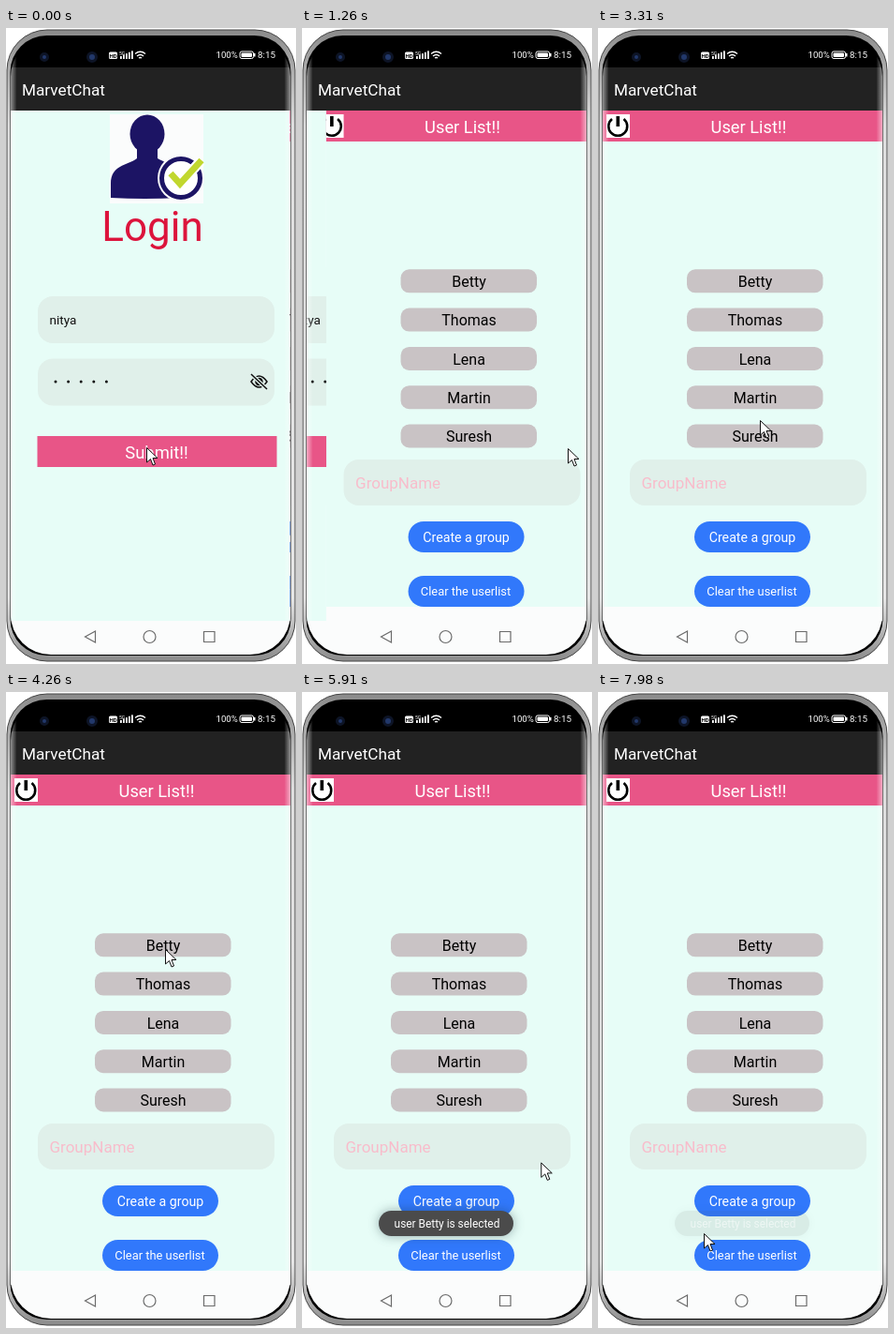
Write an HTML page that moves like this. It is 310 px wide and 678 px high and loops after 8000 ms.

```html
<!DOCTYPE html>
<html lang="en">
<head>
<meta charset="utf-8">
<title>Chat login</title>
<style>
  html, body { margin: 0; width: 100%; height: 100%; overflow: hidden; background: #fff; }
  svg { display: block; width: 310px; height: 678px; font-family: Roboto, "Noto Sans", sans-serif; }
  .mid { text-anchor: middle; }
  .bar { fill: #e85587; }
  .field { fill: #e0f0ea; }
  .pill { fill: #c9c3c5; }
  .btn { fill: #3178fb; }
  .light { fill: #fff; }
  .paper { fill: #fbfcfc; }
  .mint { fill: #e7fdf7; }
  .navy { fill: #1c1464; }
  .line { fill: none; stroke: #6b6b6b; stroke-width: 1.2; }
  #halo { filter: drop-shadow(0 0 6px rgba(20, 50, 60, .4)); }
</style>
</head>
<body>
<svg viewBox="0 0 310 678">
  <defs>
    <clipPath id="screen"><rect x="5" y="9" width="299" height="659" rx="43"/></clipPath>
    <clipPath id="reveal"><rect id="edge" x="5" y="88" width="299" height="544"/></clipPath>
    <linearGradient id="metal" x2="0" y2="1">
      <stop offset="0" stop-color="#8a8a8a"/>
      <stop offset=".15" stop-color="#dedede"/>
      <stop offset=".9" stop-color="#e6e6e6"/>
      <stop offset="1" stop-color="#8a8a8a"/>
    </linearGradient>
    <linearGradient id="shine">
      <stop offset="0" stop-color="#fff" stop-opacity=".5"/>
      <stop offset=".022" stop-color="#fff" stop-opacity="0"/>
      <stop offset=".978" stop-color="#fff" stop-opacity="0"/>
      <stop offset="1" stop-color="#fff" stop-opacity=".5"/>
    </linearGradient>
  </defs>

  <!-- phone body -->
  <rect x="1" y="2" width="308" height="673" rx="43" fill="url(#metal)" stroke="#444"/>
  <rect x="4.500" y="8" width="300" height="661" rx="39"/>

  <g clip-path="url(#screen)">
    <rect y="42" width="310" height="46" fill="#222"/>
    <rect class="paper" y="88" width="310" height="580"/>

    <g id="login">
      <rect class="mint" x="5" y="88" width="360" height="544"/>
      <rect class="paper" x="111" y="92" width="100" height="95"/>
      <g class="navy">
        <ellipse cx="151" cy="113" rx="18.500" ry="20.500"/>
        <path d="M140 125h22v14c12 7 23 5 23 20v22q-37 2-73 0v-15c0-20 17-19 28-27Z"/>
      </g>
      <circle class="paper" cx="187" cy="160" r="25"/>
      <circle class="light" cx="187" cy="160" r="20.500" stroke="#1c1464" stroke-width="5"/>
      <g fill="none">
        <path d="M176 156l10 10 22-24" stroke="#fff" stroke-width="11"/>
        <path d="M176 155l10 11 23-25" stroke="#c1d72e" stroke-width="7"/>
      </g>
      <text class="mid" x="156.500" y="227" font-size="44" fill="#dc143c">Login</text>
      <rect class="field" x="34" y="286" width="253" height="50" rx="16"/>
      <text x="46.500" y="316" font-size="13.500" fill="#111">nitya</text>
      <rect class="field" x="34" y="352.500" width="253" height="50" rx="16"/>
      <g id="dots" fill="#111"></g>
      <g fill="none" stroke="#111" stroke-width="1.500">
        <path d="M262 377q8.500-12 17 0q-8.500 12-17 0Z"/>
        <circle cx="270.500" cy="377" r="3.500" fill="#111"/>
        <path d="M263 370l16 15" stroke="#e0f0ea" stroke-width="4"/>
        <path d="M262 369l17 16"/>
      </g>
      <rect class="bar" x="33.500" y="435" width="256" height="33"/>
      <text class="mid light" x="161" y="458.500" font-size="18.400">Submit!!</text>
    </g>

    <g clip-path="url(#reveal)">
      <g id="users">
        <rect class="paper" x="5" y="88" width="299" height="544"/>
        <rect class="mint" x="5" y="88" width="299" height="529"/>
        <rect class="bar" x="5" y="88" width="299" height="33"/>
        <rect class="light" x="9" y="92" width="25" height="25"/>
        <g fill="none" stroke="#000">
          <path d="M15 97a10 10 0 1 0 12.500 0" stroke-width="2.600"/>
          <path d="M21.300 94v11" stroke-width="3.600"/>
        </g>
        <text class="mid light" x="161" y="111.500" font-size="18.300">User List!!</text>
        <g id="names"></g>
        <rect class="field" x="34" y="460" width="253" height="49" rx="16"/>
        <text x="46.500" y="491" font-size="17" fill="#f8bccb">GroupName</text>
        <rect class="btn" x="103" y="526" width="124" height="33" rx="16.500"/>
        <text class="mid light" x="165" y="547.500" font-size="14.200">Create a group</text>
        <rect class="btn" x="103" y="584" width="124" height="33" rx="16.500"/>
        <text class="mid light" x="164.500" y="605" font-size="12.900">Clear the userlist</text>
      </g>
    </g>

    <rect x="5" y="9" width="299" height="659" fill="url(#shine)"/>
    <path class="line" d="M95.500 643v12l-11-6ZM211.500 643.500h11.500v11h-11.500Z"/>
    <circle class="line" cx="153.500" cy="649" r="6.500"/>
  </g>

  <!-- status bar -->
  <g fill="#22386a" stroke="#0d1426" stroke-width="3">
    <circle cx="41" cy="31" r="3.500"/><circle cx="92" cy="31" r="4.500"/>
  </g>
  <g class="light">
    <rect x="110" y="25.500" width="9" height="7.500" rx="1.500"/>
    <text class="mid" x="114.500" y="31.500" font-size="6" font-weight="700" fill="#000">HD</text>
    <text x="121" y="28.500" font-size="5">5G</text>
    <g id="signal"></g>
    <path d="M138 27.500q5.500-4.500 11 0M140 30q3.500-3 7 0M142 32q1.500-1 3 0" fill="none" stroke="#fff" stroke-width="1.400"/>
    <text x="224.500" y="32" font-size="9.600">100%</text>
    <rect x="250" y="25" width="14.500" height="7.500" rx="2" fill="none" stroke="#fff"/>
    <rect x="251.500" y="26.500" width="11.500" height="4.500" rx="1"/>
    <rect x="265" y="27" width="1.500" height="3.500"/>
    <text x="269" y="32" font-size="9.800">8:15</text>
    <text x="17" y="72" font-size="17.200">MarvetChat</text>
  </g>

  <g id="toast">
    <rect id="halo" x="82" y="553" width="144" height="27" rx="13.500" fill="#4b4b4b"/>
    <text id="note" class="mid light" x="155" y="571" font-size="11.900">user Betty is selected</text>
  </g>
  <path id="cursor" class="light" d="M.5.5v15.500l4-3.500 2.500 6.500 2.500-1-2.500-6.500h5Z" stroke="#111"/>
</svg>
<script>
const LOOP = 8000, STEP = 150, WIDTH = 297, LEFT = 6;
const SLIDE_AT = 1260, TOAST_IN = 5450, TOAST_OUT = 7880;

// Rests and turning points of the pointer: time, x, y.
const path = [
  [300, 150, 447], [450, 240, 390], [600, 284, 448], [1350, 284, 448],
  [1950, 164, 187], [2400, 112, 118], [2850, 219, 250], [3300, 173, 418],
  [3600, 136, 584], [3900, 170, 274], [4500, 170, 274], [5100, 147, 571],
  [5400, 279, 590], [6600, 204, 310], [7350, 204, 310], [7500, 246, 360],
  [7800, 140, 592], [7950, 113, 577]
];

const $ = id => document.getElementById(id);
const clamp = v => Math.min(1, Math.max(0, v));
const ease = v => v * v * (3 - 2 * v);
const shift = (id, x, y = 0) => $(id).setAttribute('transform', `translate(${x} ${y})`);
const repeat = (id, items, make) => { $(id).innerHTML = items.map(make).join(''); };
const five = [0, 1, 2, 3, 4];

repeat('dots', five, i => `<circle cx="${53 + 13.6 * i}" cy="377" r="1.5"/>`);
repeat('signal', five, i =>
  `<rect x="${122 + 3 * i}" y="${30 - 1.4 * i}" width="1.8" height="${3 + 1.4 * i}"/>`);
repeat('names', ['Betty', 'Thomas', 'Lena', 'Martin', 'Suresh'], (name, i) => {
  const y = 257.3 + 41.3 * i;
  return `<rect class="pill" x="95" y="${y}" width="145.5" height="25" rx="9"/>
    <text class="mid" x="168" y="${y + 18.7}" font-size="16">${name}</text>`;
});

function pointerAt(t) {
  const next = path.findIndex(p => p[0] > t);
  if (next < 1) return path.at(next).slice(1);
  const [t0, x0, y0] = path[next - 1], [t1, x1, y1] = path[next];
  const k = ease((t - t0) / (t1 - t0));
  return [x0 + (x1 - x0) * k, y0 + (y1 - y0) * k];
}

function draw(t) {
  shift('cursor', ...pointerAt(Math.floor(t / STEP) * STEP));

  const steps = Math.max(0, Math.floor((t - SLIDE_AT) / STEP) + 1);
  const rest = .067 ** steps;
  const hidden = WIDTH * rest;
  $('edge').setAttribute('x', steps > 2 ? LEFT - 1 : LEFT + hidden);
  shift('users', hidden * .53);
  shift('login', -.2 * (WIDTH - hidden));

  const shown = Math.min(clamp((t - TOAST_IN) / 150), clamp(1 - (t - TOAST_OUT) / 110));
  $('halo').style.opacity = shown;
  $('note').style.opacity = Math.sqrt(Math.sqrt(shown));
}

let start;
function tick(now) {
  start ??= now;
  draw((now - start) % LOOP);
  requestAnimationFrame(tick);
}
draw(0);
requestAnimationFrame(tick);
</script>
</body>
</html>
```
